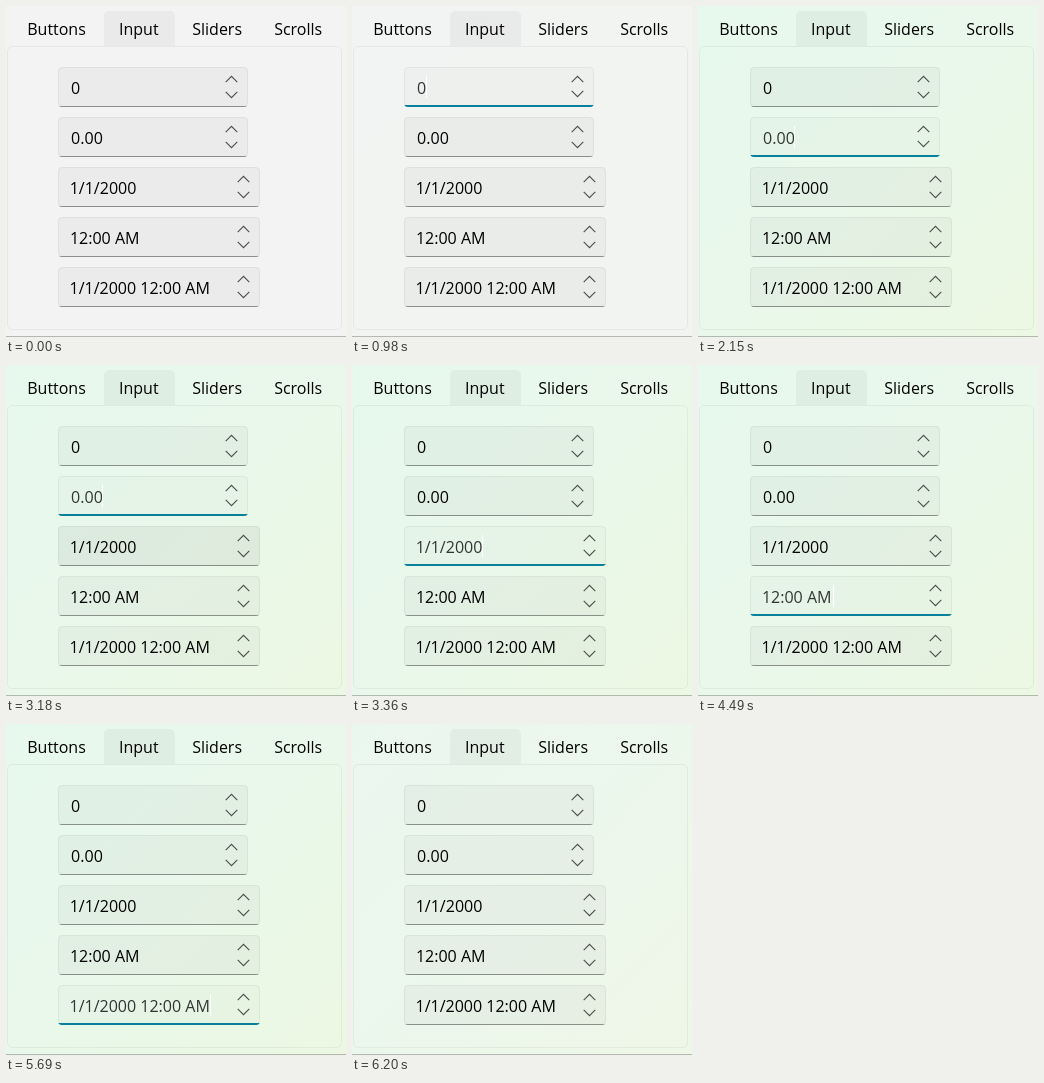
An HTML page with a canvas for the animation above (6.25 s loop, 340 by 331 pixels).

```html
<!DOCTYPE html>
<html lang="en">
<head>
<meta charset="utf-8">
<title>Input form</title>
<style>
  html, body { margin: 0; width: 100%; height: 100%; overflow: hidden; background: #f3f3f3; }
  canvas { display: block; width: 340px; height: 331px; }
</style>
</head>
<body>
<canvas id="stage"></canvas>
<script>
const W = 340, H = 331, LOOP = 6250, BLINK = 515;
const canvas = document.getElementById('stage');
const ctx = canvas.getContext('2d');
const ratio = window.devicePixelRatio || 1;
canvas.width = W * ratio;
canvas.height = H * ratio;
ctx.scale(ratio, ratio);

const FONT = '16px "Open Sans", "Noto Sans", sans-serif';
const tabs = [['Buttons', 21.2], ['Input', 113], ['Sliders', 186.2], ['Scrolls', 268.2]];

// Each field is hovered, then focused, then left.
const fields = [
  { text: '0', x: 65.1, w: 190, hover: 30, focus: 980, blur: 2150, caret: 74 },
  { text: '0.00', x: 65.1, w: 190, hover: 1560, focus: 2150, blur: 3360, caret: 96 },
  { text: '1/1/2000', x: 63.7, w: 202, hover: 2660, focus: 3360, blur: 4490, caret: 130 },
  { text: '12:00 AM', x: 63.9, w: 202, hover: 3820, focus: 4490, blur: 5690, caret: 135 },
  { text: '1/1/2000 12:00 AM', x: 63.5, w: 202, hover: 5020, focus: 5690, blur: 6200, caret: 204 }
];

const ramp = (t, start, len) => Math.max(0, Math.min(1, (t - start) / len));
const shade = a => `rgba(0,0,0,${a})`;
const mix = (a, b, k) => `rgb(${a.map((v, i) => Math.round(v + (b[i] - v) * k)).join(',')})`;

function box(x, y, w, h, r) {
  ctx.beginPath();
  ctx.roundRect(x, y, w, h, r);
}

function label(text, x, y, color) {
  ctx.fillStyle = color;
  ctx.fillText(text, x, y);
}

function chevron(x, y, dy) {
  ctx.beginPath();
  ctx.moveTo(x - 5.8, y);
  ctx.lineTo(x, y + dy);
  ctx.lineTo(x + 5.8, y);
  ctx.stroke();
}

function drawBackdrop(tint) {
  const gray = [243, 243, 243];
  const g = ctx.createLinearGradient(0, 0, W, H);
  g.addColorStop(0, mix(gray, [231, 248, 238], tint));
  g.addColorStop(0.5, mix(gray, [233, 248, 234], tint));
  g.addColorStop(1, mix(gray, [236, 248, 227], tint));
  ctx.fillStyle = g;
  ctx.fillRect(0, 0, W, H);
}

function drawTabs() {
  box(1.5, 40.5, 334, 283, 5);
  ctx.strokeStyle = shade(0.05);
  ctx.lineWidth = 1;
  ctx.stroke();
  box(98, 5, 71, 35, [5, 5, 0, 0]);
  ctx.fillStyle = shade(0.04);
  ctx.fill();
  for (const [text, x] of tabs) label(text, x, 29, '#000');
  ctx.fillStyle = shade(0.25);
  ctx.fillRect(0, 330, W, 1);
}

function drawField(f, y, t, tint) {
  const focused = t >= f.focus && t < f.blur;
  const hover = t < f.focus ? ramp(t, f.hover, 80) : 0;
  const fill = focused ? 0.016 : 0.03 + 0.02 * hover * tint;
  const x = 52;

  box(x, y, f.w, 40, 4);
  ctx.fillStyle = shade(fill);
  ctx.fill();
  box(x + 0.5, y + 0.5, f.w - 1, 39, 4);
  ctx.strokeStyle = shade(0.05);
  ctx.lineWidth = 1;
  ctx.stroke();

  // Bottom edge, clipped so it follows the rounded corners.
  ctx.save();
  box(x, y, f.w, 40, 4);
  ctx.clip();
  ctx.fillStyle = focused ? '#087f9b' : shade(0.37);
  const edge = focused ? 2 : 1;
  ctx.fillRect(x, y + 40 - edge, f.w, edge);
  ctx.restore();

  label(f.text, f.x, y + 27, focused ? shade(0.78) : '#000');
  if (focused && (t - f.focus) % (2 * BLINK) < BLINK) {
    ctx.fillStyle = '#fff';
    ctx.fillRect(f.caret, y + 9, 1, 22);
  }

  ctx.strokeStyle = shade(0.68);
  ctx.lineWidth = 1.1;
  const ax = x + f.w - 16.5;
  chevron(ax, y + 15.2, -5.8);
  chevron(ax, y + (focused ? 23.8 : 24.8), 5.8);
}

function draw(now) {
  const t = now % LOOP;
  const tint = t < 6200 ? ramp(t, 950, 230) * (t >= 980) : 0.75;
  ctx.font = FONT;
  ctx.textBaseline = 'alphabetic';
  drawBackdrop(tint);
  drawTabs();
  fields.forEach((f, i) => drawField(f, 61 + i * 50, t, tint));
}

const start = performance.now();
function tick() {
  draw(performance.now() - start);
  requestAnimationFrame(tick);
}
tick();
</script>
</body>
</html>
```
